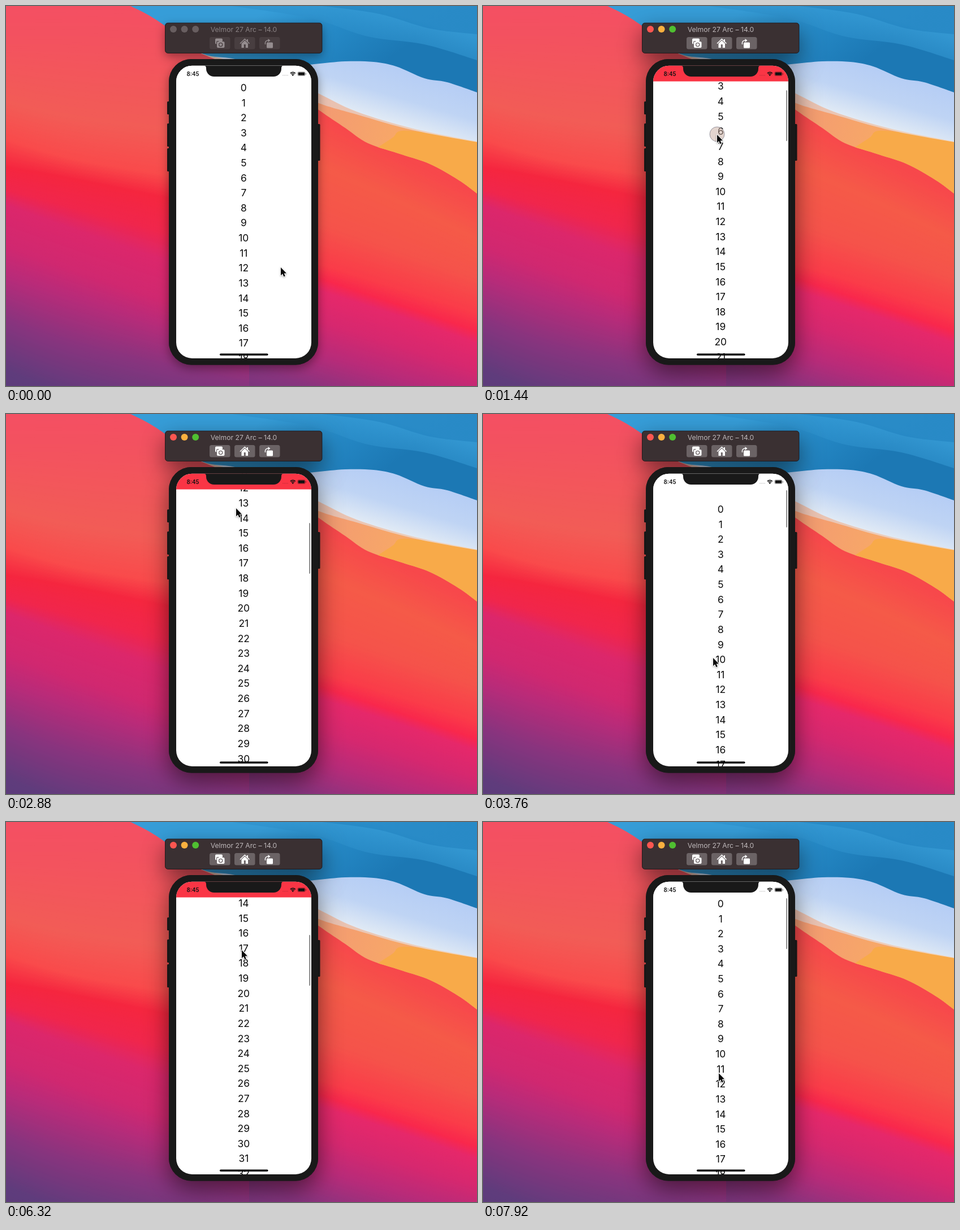
An HTML page with a canvas that plays this animation: 833x673 px, repeating every 8 s.

```html
<!DOCTYPE html>
<html lang="en">
<head>
<meta charset="utf-8">
<title>Scroll header</title>
<style>
  html, body { margin: 0; width: 100%; height: 100%; overflow: hidden; background: #f2555c; }
  canvas { display: block; }
</style>
</head>
<body>
<canvas id="stage" width="833" height="673"></canvas>
<script>
const W = 833, H = 673, LOOP = 8000, STEP = 80;
const ROW = 26.62, FIRST = 144.5;
const ctx = document.getElementById('stage').getContext('2d');

const ease = {
  lin: p => p,
  in: p => p * p,
  out: p => 1 - (1 - p) ** 2,
  settle: p => 1 - (1 - p) ** 3,
  both: p => p * p * (3 - 2 * p)
};

// Each key: time, easing of the way there, then values.
const pointerKeys = [
  [0, 'lin', 486, 463], [160, 'lin', 486, 463], [700, 'both', 416, 310],
  [800, 'lin', 416, 310], [1440, 'lin', 414, 228], [1700, 'lin', 407, 167],
  [2960, 'lin', 407, 167], [3320, 'in', 407, 432], [3840, 'lin', 407, 432],
  [4240, 'both', 409, 178], [4300, 'lin', 409, 178], [4960, 'both', 404, 502],
  [5160, 'lin', 404, 502], [5500, 'both', 410, 480], [5600, 'lin', 410, 480],
  [5900, 'in', 417, 227], [6500, 'lin', 417, 227], [6860, 'in', 417, 445],
  [LOOP, 'lin', 417, 445]
];
const scrollKeys = [
  [0, 'lin', 0], [800, 'lin', 0], [1440, 'lin', 82.3], [1700, 'lin', 143],
  [2800, 'settle', 333], [2960, 'lin', 333], [3320, 'in', 68],
  [3520, 'out', -70], [4100, 'out', 0], [4300, 'lin', 0],
  [4960, 'both', -131], [5120, 'lin', -131], [5560, 'settle', 0],
  [5600, 'lin', 0], [5900, 'in', 253], [6500, 'settle', 377],
  [6860, 'in', 159], [7040, 'out', -60], [7520, 'out', 0], [LOOP, 'lin', 0]
];
const touches = [[800, 1700], [2960, 3320], [4300, 5120], [5600, 5900], [6500, 6860]];

function sample(keys, t) {
  const i = Math.max(1, keys.findIndex(k => k[0] > t));
  const a = keys[i - 1], b = keys[i];
  const p = ease[b[1]]((t - a[0]) / (b[0] - a[0]));
  return b.slice(2).map((v, n) => a[n + 2] + (v - a[n + 2]) * p);
}

function curve(g, pts) {
  g.lineTo(...pts[0]);
  for (let i = 0; i < pts.length - 1; i++) {
    const a = pts[Math.max(0, i - 1)], b = pts[i], c = pts[i + 1], d = pts[Math.min(pts.length - 1, i + 2)];
    g.bezierCurveTo(b[0] + (c[0] - a[0]) / 6, b[1] + (c[1] - a[1]) / 6,
      c[0] - (d[0] - b[0]) / 6, c[1] - (d[1] - b[1]) / 6, c[0], c[1]);
  }
}

function blend(g, x0, y0, x1, y1, ...colors) {
  const s = g.createLinearGradient(x0, y0, x1, y1);
  colors.forEach((c, i) => s.addColorStop(i / (colors.length - 1), c));
  return s;
}

// Area between a curve and the top right corner.
function above(g, pts, fill) {
  g.beginPath();
  curve(g, pts);
  g.lineTo(W, 0);
  g.lineTo(pts[0][0], 0);
  g.fillStyle = fill;
  g.fill();
}

// Soft bands that follow curved contours; each level is [three heights, colour].
function bands(g, xs, levels) {
  const rgb = c => [1, 3, 5].map(i => parseInt(c.substr(i, 2), 16));
  for (let i = 0; i < levels.length - 1; i++) {
    const [ya, ca] = levels[i], [yb, cb] = levels[i + 1];
    const A = rgb(ca), B = rgb(cb), n = 30;
    for (let k = 0; k < n; k++) {
      const mix = (a, b) => a + (b - a) * k / n;
      g.beginPath();
      curve(g, xs.map((x, j) => [x, mix(ya[j], yb[j])]));
      g.lineTo(xs[2], 900);
      g.lineTo(xs[0], 900);
      g.fillStyle = `rgb(${A.map((v, j) => Math.round(mix(v, B[j])))})`;
      g.fill();
    }
  }
}

function wallpaper(g) {
  bands(g, [0, 140, 430], [
    [[-120, -120, -120], '#f64a69'], [[60, 60, 70], '#f3525f'],
    [[170, 200, 235], '#f25c56'], [[235, 275, 320], '#f94a4b'],
    [[285, 310, 370], '#f5263f'], [[325, 362, 440], '#f0264c'],
    [[352, 402, 500], '#dc276b'], [[425, 475, 570], '#d02870'],
    [[475, 520, 610], '#b92b79'], [[555, 605, 670], '#88347e'],
    [[645, 695, 760], '#5f3c7c'], [[760, 800, 850], '#553b78']
  ]);
  g.save();
  g.beginPath();
  g.rect(430, 0, W, H);
  g.clip();
  bands(g, [430, 690, 833], [
    [[-50, 100, 200], '#f5464b'], [[130, 263, 332], '#f7484b'],
    [[225, 340, 410], '#f55a48'], [[340, 430, 480], '#f5534a'],
    [[420, 500, 545], '#fa3b49'], [[440, 527, 575], '#f9284c'],
    [[465, 547, 597], '#e6286a'], [[520, 600, 645], '#d6286f'],
    [[580, 655, 695], '#b82b79'], [[640, 720, 760], '#88347e'],
    [[740, 820, 850], '#5f3c7c']
  ]);
  g.restore();

  const lower = [[345, 84], [400, 100], [480, 130], [553, 184], [600, 216], [640, 243], [700, 263], [750, 280], [800, 308], [833, 332]];
  above(g, lower, blend(g, 553, 190, 690, 230, '#f39a72', '#f7a768'));
  g.save();
  g.beginPath();
  curve(g, lower);
  g.lineTo(W, 0);
  g.clip();
  g.beginPath();
  curve(g, [[760, 226], [700, 221], [684, 233], [655, 252]]);
  g.lineTo(W, 400);
  g.lineTo(W, 230);
  g.fillStyle = '#f8aa49';
  g.fill();
  g.restore();
  above(g, [[345, 84], [480, 140], [553, 172], [620, 192], [720, 220], [833, 241]], blend(g, 553, 170, 800, 230, '#e9bfae', '#eed5c2'));
  above(g, [[345, 84], [480, 120], [553, 155], [620, 187], [720, 217], [833, 240]], blend(g, 720, 115, 690, 215, '#b5cdf5', '#bfd4f4', '#e5edf5'));

  const sky = [[220, 0], [250, 15], [281, 35], [345, 83], [400, 93], [480, 108], [545, 103], [600, 98], [650, 99], [690, 107], [740, 128], [780, 135], [833, 153]];
  above(g, sky, blend(g, 470, 0, 590, 160, '#369dd8', '#2589c6', '#1c78b4'));
  g.beginPath();
  curve(g, [[400, 0], [540, 22], [640, 54], [740, 68], [833, 96]]);
  g.lineTo(W, 0);
  g.fillStyle = blend(g, 650, 0, 625, 80, 'rgba(58,160,218,.75)', 'rgba(40,138,198,.45)');
  g.fill();
  g.beginPath();
  curve(g, [[560, 0], [660, 14], [750, 40], [833, 50]]);
  g.lineTo(W, 0);
  g.fillStyle = 'rgba(26,120,182,.4)';
  g.fill();
}

function box(g, x, y, w, h, r, fill) {
  g.beginPath();
  g.roundRect(x, y, w, h, r);
  g.fillStyle = fill;
  g.fill();
}

function disc(g, x, y, r, fill) {
  g.beginPath();
  g.arc(x, y, r, 0, 7);
  g.fillStyle = fill;
  g.fill();
}

function label(g, text, x, y, font, fill, align = 'center') {
  g.font = font + ' Inter, "Liberation Sans", sans-serif';
  g.textAlign = align;
  g.textBaseline = 'alphabetic';
  g.fillStyle = fill;
  g.fillText(text, x, y);
}

function icons(g, ink, back) {
  // Camera
  box(g, 370, 57.5, 13, 10, 2, ink);
  box(g, 372, 62, 15, 12.5, 2, back);
  box(g, 373, 63, 13.5, 11, 2, ink);
  box(g, 376.5, 61, 6, 4, 1, ink);
  g.strokeStyle = back;
  g.lineWidth = 1.3;
  g.beginPath();
  g.arc(379.7, 68.5, 3.1, 0, 7);
  g.stroke();
  // House
  g.strokeStyle = ink;
  g.lineWidth = 1.6;
  g.beginPath();
  g.moveTo(414, 66.5);
  g.lineTo(422.3, 58.5);
  g.lineTo(430.5, 66.5);
  g.stroke();
  g.beginPath();
  g.moveTo(416.5, 66.5);
  g.lineTo(422.3, 61);
  g.lineTo(428, 66.5);
  g.lineTo(428, 74);
  g.lineTo(416.5, 74);
  g.fillStyle = ink;
  g.fill();
  g.fillRect(426, 59, 2, 4);
  g.fillStyle = back;
  g.fillRect(420.8, 68, 3, 6);
  // Rotate
  box(g, 461, 64.5, 11, 10, 1.5, ink);
  g.lineWidth = 1.4;
  g.beginPath();
  g.moveTo(458.5, 68);
  g.quadraticCurveTo(457.5, 61, 464, 61);
  g.stroke();
  g.beginPath();
  g.moveTo(463.5, 58);
  g.lineTo(467.5, 61);
  g.lineTo(463.5, 64);
  g.fillStyle = ink;
  g.fill();
}

function device(g, active) {
  const body = () => box(g, 288, 94, 264, 541.5, 40, '#191919');
  const bar = () => box(g, 281.5, 30, 277.5, 53.5, 5, '#3a3032');
  g.save();
  g.shadowColor = active ? 'rgba(0,0,0,.52)' : 'rgba(0,0,0,.4)';
  g.shadowBlur = active ? 42 : 18;
  g.shadowOffsetY = active ? 15 : 6;
  body();
  bar();
  g.restore();
  for (const [x, y, h] of [[285, 169, 23], [285, 208, 41], [285, 252, 41], [550, 209, 65]])
    box(g, x, y, 5.5, h, 1.5, '#161616');
  body();
  bar();
  g.strokeStyle = 'rgba(20,14,16,.7)';
  g.lineWidth = 1;
  g.beginPath();
  g.roundRect(281.5, 30, 277.5, 53.5, 5);
  g.stroke();

  const lights = active ? ['#fb5650', '#f9b03f', '#4fbf31'] : Array(3).fill('#685e60');
  lights.forEach((c, i) => disc(g, 296 + i * 19.6, 41, 6, c));
  label(g, 'Velmor 27 Arc – 14.0', 420.5, 45.8, '12.2px', active ? '#bdb7b9' : '#8a8284');
  const back = active ? '#6b6365' : '#483e40';
  [360, 404, 448].forEach(x => box(g, x, 55, 36.5, 21.5, 3.5, back));
  icons(g, active ? '#ffffff' : '#958d8f', back);
}

function layer(paint) {
  const c = document.createElement('canvas');
  c.width = W;
  c.height = H;
  paint(c.getContext('2d'));
  return c;
}
const [idle, focused] = [false, true].map(on => layer(g => { wallpaper(g); device(g, on); }));

function statusBar(red) {
  label(ctx, '8:45', 330.5, 123.7, '600 9.8px', '#111');
  for (let i = 0; i < 4; i++) disc(ctx, 490 + i * 2.7, 122.7, .8, red ? '#c02c38' : '#bbb');
  ctx.strokeStyle = '#111';
  ctx.lineWidth = 1.5;
  for (const r of [6.4, 3.9]) {
    ctx.beginPath();
    ctx.arc(507.3, 123.7, r, -Math.PI * .75, -Math.PI * .25);
    ctx.stroke();
  }
  disc(ctx, 507.3, 122.4, 1.3, '#111');
  ctx.lineWidth = .7;
  ctx.strokeStyle = 'rgba(0,0,0,.45)';
  ctx.beginPath();
  ctx.roundRect(515.7, 116.7, 13.6, 7, 2);
  ctx.stroke();
  box(ctx, 516.7, 117.6, 11.6, 5.2, 1.2, '#111');
  box(ctx, 530, 119, 1, 2.4, .5, 'rgba(0,0,0,.5)');
}

function notch() {
  ctx.beginPath();
  ctx.moveTo(349, 105);
  ctx.quadraticCurveTo(354, 105.5, 354, 110);
  ctx.arcTo(354, 125, 368, 125, 14);
  ctx.arcTo(487, 125, 487, 111, 14);
  ctx.lineTo(487, 110);
  ctx.quadraticCurveTo(487, 105.5, 492, 105);
  ctx.fillStyle = '#191919';
  ctx.fill();
}

function screen(offset, showBar) {
  const red = offset > .5;
  ctx.save();
  ctx.beginPath();
  ctx.roundRect(301, 105.7, 239, 518.3, 28);
  ctx.clip();
  ctx.fillStyle = '#fff';
  ctx.fillRect(300, 105, 242, 520);
  const start = Math.max(0, Math.floor(offset / ROW) - 1);
  for (let n = start; n < start + 22; n++)
    label(ctx, n, 420.3, FIRST + n * ROW - offset + 6.4, '17.4px', '#0a0a0a');
  ctx.fillStyle = red ? '#fa3545' : '#fff';
  ctx.fillRect(300, 105, 242, 28.5);
  if (showBar) {
    const h = Math.max(5, 90 + Math.min(0, offset));
    box(ctx, 536, 135 + Math.max(0, offset) * .174, 2.2, h, 1.1, 'rgba(0,0,0,.42)');
  }
  statusBar(red);
  notch();
  box(ctx, 378, 615.5, 85.5, 3.5, 1.7, '#000');
  ctx.restore();
}

function pointer(x, y, down) {
  if (down) {
    disc(ctx, x, y - 1, 13, 'rgba(200,172,160,.5)');
    ctx.strokeStyle = 'rgba(110,110,125,.65)';
    ctx.lineWidth = 1;
    ctx.stroke();
  }
  ctx.save();
  ctx.translate(x, y);
  ctx.beginPath();
  [[0, 0], [0, 14.3], [3.2, 11.3], [5.3, 16.3], [7.8, 15.2], [5.7, 10.4], [10, 10.2]]
    .forEach(p => ctx.lineTo(...p));
  ctx.closePath();
  ctx.shadowColor = 'rgba(0,0,0,.35)';
  ctx.shadowBlur = 3;
  ctx.shadowOffsetY = 1;
  ctx.strokeStyle = '#fff';
  ctx.lineWidth = 1.8;
  ctx.lineJoin = 'round';
  ctx.stroke();
  ctx.shadowColor = 'transparent';
  ctx.fillStyle = '#080808';
  ctx.fill();
  ctx.restore();
}

function draw(t) {
  const active = t >= 800;
  ctx.drawImage(active ? focused : idle, 0, 0);
  screen(sample(scrollKeys, t)[0], active);
  pointer(...sample(pointerKeys, t), touches.some(([a, b]) => t >= a && t < b));
}

let begin;
function tick(now) {
  begin ??= now;
  draw(Math.floor(((now - begin) % LOOP) / STEP) * STEP);
  requestAnimationFrame(tick);
}
draw(0);
requestAnimationFrame(tick);
</script>
</body>
</html>
```
